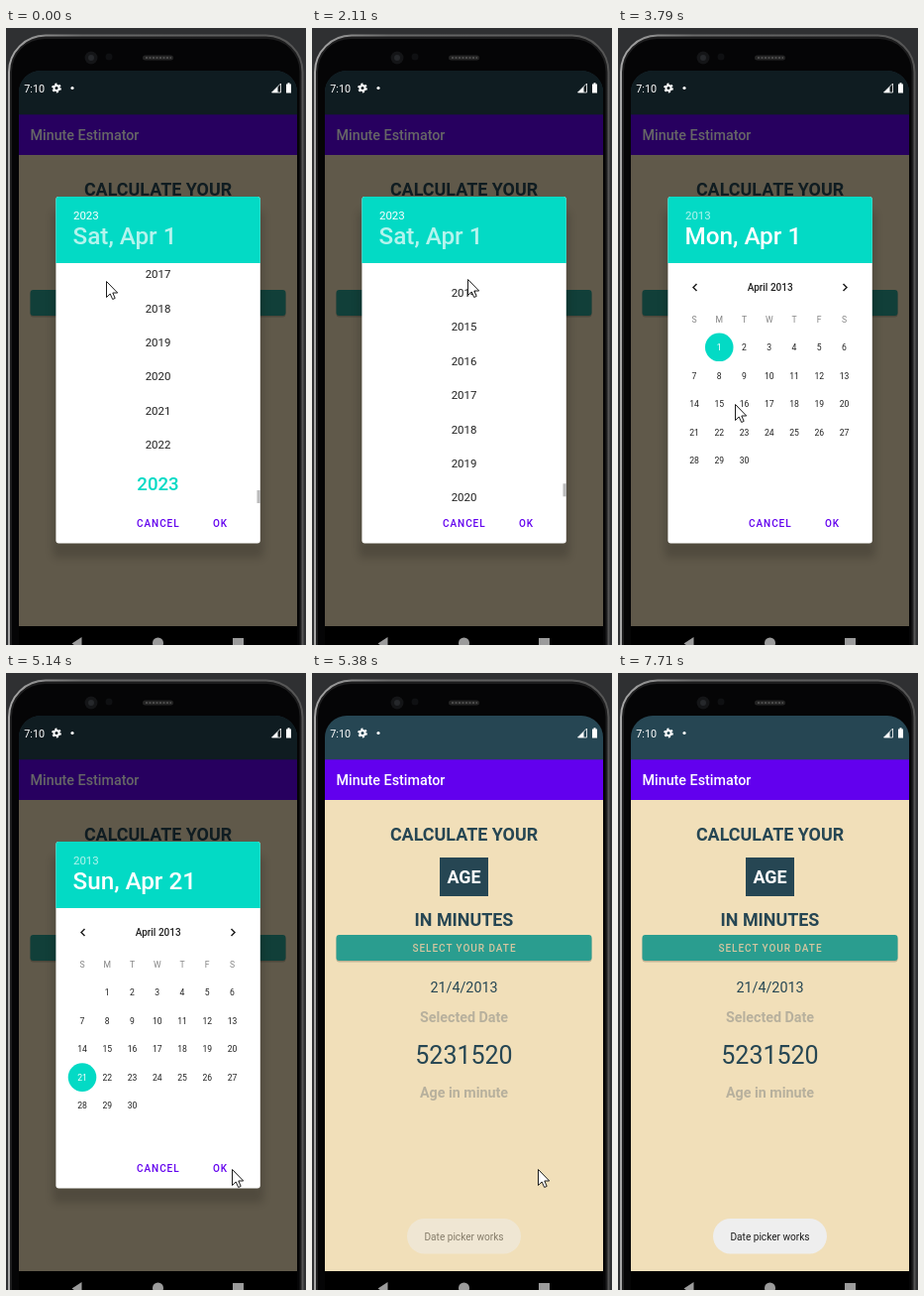
An HTML page that plays this animation: 303 px wide and 622 px high, repeating every 7830 ms.

```html
<!DOCTYPE html>
<html lang="en">
<head>
<meta charset="utf-8">
<title>Age in minutes</title>
<style>
  html, body { margin: 0; width: 100%; height: 100%; overflow: hidden; background: #2f3032; }
  svg { display: block; width: 303px; height: 622px; font-family: Roboto, sans-serif; }
  .mid { text-anchor: middle; }
  .bold { font-weight: 700; }
  .med { font-weight: 500; }
  .caps { font-size: 10px; font-weight: 500; letter-spacing: .95px; }
  .big { font-size: 17.9px; font-weight: 700; }
  .day { font-size: 8.6px; text-anchor: middle; fill: #212121; }
  .year { font-size: 11.45px; text-anchor: middle; fill: #212121; }
  .chosen { font-size: 18.6px; font-weight: 500; text-anchor: middle; fill: #03dac5; }
</style>
</head>
<body>
<svg viewBox="0 0 303 622">
  <defs>
    <clipPath id="screen"><path d="M13 603V65a22 22 0 0 1 22-22H272a22 22 0 0 1 22 22V603Z"/></clipPath>
    <clipPath id="listClip"><rect x="50" y="237" width="207" height="242"/></clipPath>
    <filter id="soft" x="-20%" y="-20%" width="140%" height="140%"><feGaussianBlur stdDeviation="4"/></filter>
    <linearGradient id="rim">
      <stop offset="0" stop-color="#a6a6a6"/><stop offset=".25" stop-color="#6a6a6a"/><stop offset="1" stop-color="#555"/>
    </linearGradient>
  </defs>

  <!-- phone body -->
  <rect width="303" height="622" fill="#2f3032"/>
  <rect x="3" y="7.5" width="296.5" height="700" rx="37" fill="#1c1c1d" stroke="url(#rim)" stroke-width="2"/>
  <rect x="6" y="11" width="290.5" height="700" rx="33" fill="#050506"/>
  <circle cx="86" cy="30" r="6.5" fill="#141517"/>
  <circle cx="86" cy="30" r="3" fill="#26282b"/>
  <circle cx="104" cy="29" r="3.5" fill="#0f1012"/>
  <rect x="138" y="27.5" width="31" height="5" rx="2.5" fill="#242424"/>
  <path d="M141 30H167" stroke="#4a4a4a" stroke-width="2" stroke-dasharray="2 1.5"/>

  <!-- app -->
  <g clip-path="url(#screen)">
    <rect x="13" y="43" width="281" height="45" fill="#264653"/>
    <rect x="13" y="128" width="281" height="475" fill="#f1dfb9"/>
    <rect x="13" y="87.3" width="281" height="40.7" fill="#6200ee"/>
    <text x="24.5" y="113" font-size="14.3" class="med" fill="#fff">Minute Estimator</text>
    <g class="mid" fill="#264653">
      <text x="153.5" y="169.4" class="big">CALCULATE YOUR</text>
      <rect x="129" y="186" width="49" height="39"/>
      <text x="153.5" y="212" class="big" fill="#fff">AGE</text>
      <text x="153.5" y="254.8" class="big">IN MINUTES</text>
      <rect x="24.5" y="265.5" width="258" height="26" rx="3" fill="#000" opacity=".2"/>
      <rect x="24.5" y="264" width="258" height="26" rx="3" fill="#2a9d8f"/>
      <text x="154" y="281" class="caps" fill="#d5c6a0">SELECT YOUR DATE</text>
      <g id="result">
        <text x="153.5" y="321.5" font-size="14.3">21/4/2013</text>
        <text x="153.5" y="394" font-size="25">5231520</text>
      </g>
      <g font-size="14.3" class="bold" fill="#b7b09d">
        <text x="153.5" y="352">Selected Date</text>
        <text x="153.5" y="428">Age in minute</text>
      </g>
    </g>
    <rect id="scrim" x="13" y="43" width="281" height="560"/>
  </g>

  <!-- system bars -->
  <g fill="#fff">
    <text x="18.3" y="65" font-size="10.8">7:10</text>
    <circle cx="51" cy="60.5" r="2.6" fill="none" stroke="#fff" stroke-width="2"/>
    <circle cx="51" cy="60.5" r="4.1" fill="none" stroke="#fff" stroke-width="1.6" stroke-dasharray="2.15"/>
    <circle cx="67" cy="60.5" r="1.6"/>
    <path d="M277.5 56V65H268.5Z" fill="none" stroke="#fff" stroke-width=".8"/>
    <path d="M274.5 59V65H268.5Z"/>
    <path d="M283 56.5h1.5v-1.3h2v1.3H288V65.5h-5Z"/>
  </g>
  <rect x="13" y="603" width="281" height="19" fill="#000"/>
  <g fill="#9b9b9b">
    <path d="M76.5 614V627L66.5 620.5Z"/>
    <circle cx="153.5" cy="620" r="5.5"/>
    <rect x="229" y="615" width="11" height="11"/>
  </g>

  <!-- date picker -->
  <g id="dialog">
    <rect x="47" y="184" width="213" height="350" rx="4" opacity=".16" filter="url(#soft)"/>
    <rect x="50.4" y="170" width="206.4" height="349.5" rx="3" fill="#fff"/>
    <path d="M50.4 237V173a3 3 0 0 1 3-3H253.800a3 3 0 0 1 3 3V237Z" fill="#03dac5"/>
    <g fill="#fff">
      <text id="headYear" x="68" y="192.700" font-size="11.450"></text>
      <text id="headDate" x="67.500" y="218" font-size="24.300" class="med"></text>
    </g>
    <g id="list" clip-path="url(#listClip)">
      <rect id="ripple" x="66" y="257.500" width="175" height="34.500" rx="3" fill="#e0e0e0"/>
      <g id="years"></g>
    </g>
    <rect id="bar" x="253.500" width="3.500" height="13" fill="#bcbcbc"/>
    <g id="month">
      <text x="153.700" y="265" font-size="10" class="mid med" fill="#212121">April 2013</text>
      <path d="M79.500 258L76 261.500L79.500 265M227.500 258L231 261.500L227.500 265" fill="none" stroke="#222" stroke-width="1.500"/>
      <circle id="pick" r="14.300" fill="#03dac5"/>
      <g id="days"></g>
    </g>
    <g class="caps" fill="#6200ee">
      <text x="132" y="503.200">CANCEL</text>
      <text x="209" y="503.200">OK</text>
    </g>
  </g>

  <g id="toast">
    <rect x="96" y="550" width="115" height="35.500" rx="17.700" fill="#eee"/>
    <text x="153.500" y="571.700" font-size="10.100" class="mid" fill="#1c1c1c">Date picker works</text>
  </g>
  <path id="cursor" d="M.5.5V16.500L4.200 13L6.700 18.500L9.200 17.400L6.800 12H11.700Z" fill="#fff" stroke="#1d1d1d"/>
</svg>

<script>
const LOOP = 7830, HOP = 140, ROW = 34.4, COL = 25.25, WEEK = 28.6;
const $ = id => document.getElementById(id);

function addText(parent, x, y, cls, str) {
  const el = document.createElementNS("http://www.w3.org/2000/svg", "text");
  el.setAttribute("x", x);
  el.setAttribute("y", y);
  el.setAttribute("class", cls);
  el.textContent = str;
  parent.append(el);
  return el;
}
function set(id, attrs) {
  for (const k in attrs) $(id).setAttribute(k, attrs[k]);
}

for (let y = 2009; y < 2023; y++) addText($("years"), 153.5, 252.2 + (y - 2017) * ROW, "year", y);
addText($("years"), 153.5, 465.5, "chosen", 2023);

const dayPos = d => [77 + (d % 7) * COL, 321.8 + Math.floor(d / 7) * WEEK];
[..."SMTWTFS"].forEach((s, i) => {
  addText($("days"), 77 + i * COL, 297.2, "day", s).style.fill = "#858585";
});
const dayText = [];
for (let d = 1; d <= 30; d++) {
  const [x, y] = dayPos(d);
  dayText[d] = addText($("days"), x, y + 3.1, "day", d);
}

// Progress from 0 to 1 in held steps, like a screen recording at a low frame rate.
function ramp(t, from, to) {
  const hops = Math.round((to - from) / HOP);
  const n = Math.floor((t - from) / (to - from) * hops + .15);
  return Math.min(Math.max(n / hops, 0), 1);
}
const easeOut = p => p * (2 - p);
const easeInOut = p => p * p * (3 - 2 * p);

// Pointer moves: from ms, to ms, target x, target y.
const moves = [
  [0, 270, 145, 304], [640, 910, 157, 298], [1040, 1310, 151, 282], [1310, 1590, 157, 253],
  [2360, 2510, 157, 266], [2770, 3190, 210, 479], [3190, 3790, 118, 379], [3790, 4170, 101, 393],
  [4170, 4440, 76, 402], [4600, 5140, 228, 500], [5670, 5810, 291, 508], [5810, 6100, 281, 542],
  [7320, 7710, 282, 640]
];

function pointer(t) {
  let x = 101, y = 255;
  for (const [from, to, tx, ty] of moves) {
    const p = easeOut(ramp(t, from, to));
    x += (tx - x) * p;
    y += (ty - y) * p;
  }
  return [x, y];
}

function draw(t) {
  const [cx, cy] = pointer(t);
  set("cursor", { transform: `translate(${cx} ${cy})` });

  const scroll = 164.6 * easeInOut(ramp(t, 1590, 2360));
  const barShown = t < 1710 ? 1 - ramp(t, 1040, 1310) : t < 2770 ? 1 : 0;
  set("years", { transform: `translate(0 ${scroll})` });
  set("bar", { y: 466 - scroll * .055, opacity: barShown });
  set("ripple", { opacity: ramp(t, 2360, 2640) });

  const month = ramp(t, 2640, 2920);
  set("list", { opacity: 1 - month });
  set("month", { opacity: month });

  const picked = t >= 2770, day = t >= 4600 ? 21 : 1;
  $("headYear").textContent = picked ? 2013 : 2023;
  $("headDate").textContent = (!picked ? "Sat" : day === 1 ? "Mon" : "Sun") + ", Apr " + day;
  set("headYear", { opacity: picked ? .7 : 1 });
  set("headDate", { opacity: picked ? 1 : .7 });
  const [px, py] = dayPos(day);
  set("pick", { cx: px, cy: py });
  for (const d of [1, 21]) dayText[d].style.fill = d === day ? "#fff" : "";

  const open = 1 - ramp(t, 5140, 5380);
  set("dialog", { opacity: open });
  set("scrim", { opacity: .6 * open });
  set("result", { opacity: open < 1 ? 1 : 0 });
  set("toast", { opacity: ramp(t, 5260, 5530) });
}

function tick() {
  draw(performance.now() % LOOP);
  requestAnimationFrame(tick);
}
tick();
</script>
</body>
</html>
```
